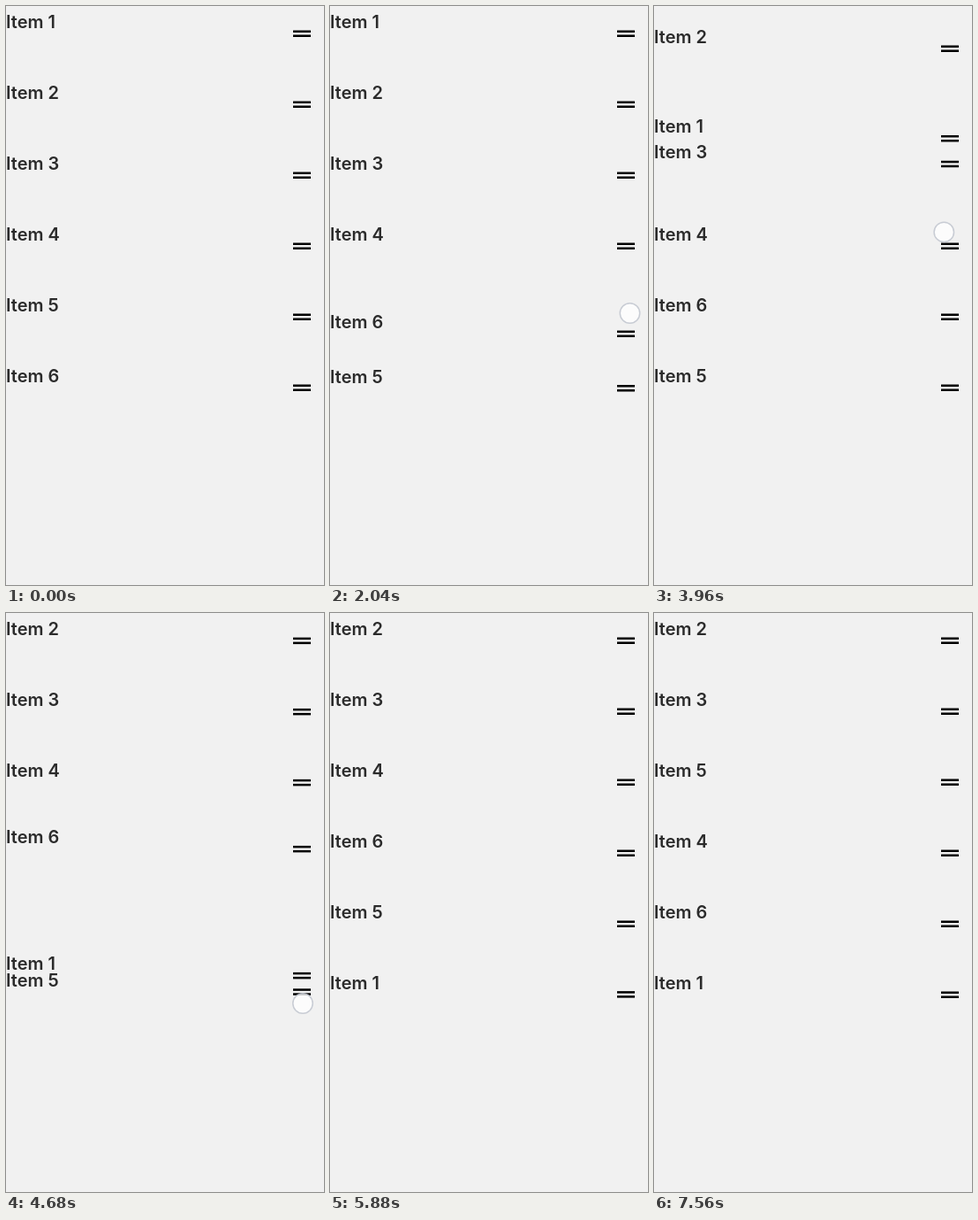
An HTML page with a canvas for the animation above (8000 ms loop, 360 by 654 pixels).

```html
<!DOCTYPE html>
<html lang="en">
<head>
<meta charset="utf-8">
<title>Sortable list</title>
<style>
  html, body { margin: 0; width: 100%; height: 100%; overflow: hidden; background: #f1f1f1; }
  canvas { display: block; }
</style>
</head>
<body>
<canvas id="stage" width="360" height="654"></canvas>
<script>
const ctx = document.getElementById('stage').getContext('2d');
const LOOP = 8000, TICK = 40, ROW = 80;
const STIFFNESS = 120, DAMPING = 14;

// Each path lists a few pointer stops: [time, x, y].
const drags = [
  { item: 5, press: 1280, release: 2280,
    path: [[1440, 330.5, 422.5], [2040, 339.5, 347], [2180, 340, 343.5]] },
  { item: 0, press: 3480, release: 5300,
    path: [[3640, 337, 35], [3900, 329, 194], [3985, 328, 281], [4360, 333, 355],
           [4500, 335, 401], [4680, 336, 441], [4960, 338, 469.5]] },
  { item: 4, press: 5960, release: 7000,
    path: [[6115, 334, 351], [6230, 335, 271], [6450, 335, 242], [6600, 336, 206], [6740, 337, 195]] }
];

const clamp = (v, lo, hi) => Math.min(hi, Math.max(lo, v));

function pointerAt(path, t) {
  const next = path.findIndex(stop => t < stop[0]);
  if (next < 0) return path[path.length - 1].slice(1);
  const [t1, x1, y1] = path[next];
  const [t0, x0, y0] = path[Math.max(0, next - 1)];
  const k = t1 > t0 ? (t - t0) / (t1 - t0) : 0;
  return [x0 + (x1 - x0) * k, y0 + (y1 - y0) * k];
}

// Run the springs once and keep the state at every tick.
function simulate() {
  const states = [];
  let order = [0, 1, 2, 3, 4, 5];
  const pos = order.map(i => i * ROW);
  const vel = order.map(() => 0);
  let home = 0;
  for (let t = 0; t < LOOP; t++) {
    const drag = drags.find(d => t >= d.press && t < d.release);
    const pointer = drag && pointerAt(drag.path, t);
    let held = 0;
    if (drag) {
      if (t === drag.press) home = order.indexOf(drag.item) * ROW;
      held = home + pointer[1] - drag.path[0][2];
      order = order.filter(i => i !== drag.item);
      order.splice(clamp(Math.floor(held / ROW), 0, 5), 0, drag.item);
    }
    if (t % TICK === 0) states.push({ pos: pos.slice(), pointer });
    order.forEach((i, slot) => {
      const target = drag && drag.item === i ? held : slot * ROW;
      vel[i] += ((target - pos[i]) * STIFFNESS - vel[i] * DAMPING) / 1000;
      pos[i] += vel[i] / 1000;
    });
  }
  return states;
}

function draw({ pos, pointer }) {
  ctx.fillStyle = '#f1f1f1';
  ctx.fillRect(0, 0, 360, 654);
  ctx.font = '600 20px Inter, Roboto, sans-serif';
  pos.forEach((y, i) => {
    ctx.fillStyle = '#2b2b2b';
    ctx.fillText('Item ' + (i + 1), 0, y + 25);
    ctx.fillStyle = '#000';
    ctx.fillRect(325, y + 27.5, 20, 2.5);
    ctx.fillRect(325, y + 32.5, 20, 2.5);
  });
  if (pointer) {
    ctx.beginPath();
    ctx.arc(...pointer, 11.2, 0, Math.PI * 2);
    ctx.fillStyle = 'rgba(255,255,255,.75)';
    ctx.fill();
    ctx.lineWidth = 1.5;
    ctx.strokeStyle = 'rgba(192,196,206,.85)';
    ctx.stroke();
  }
}

const states = simulate();
const start = performance.now();
function frame() {
  const t = (performance.now() - start) % LOOP;
  draw(states[Math.floor(t / TICK)]);
  requestAnimationFrame(frame);
}
frame();
</script>
</body>
</html>
```
